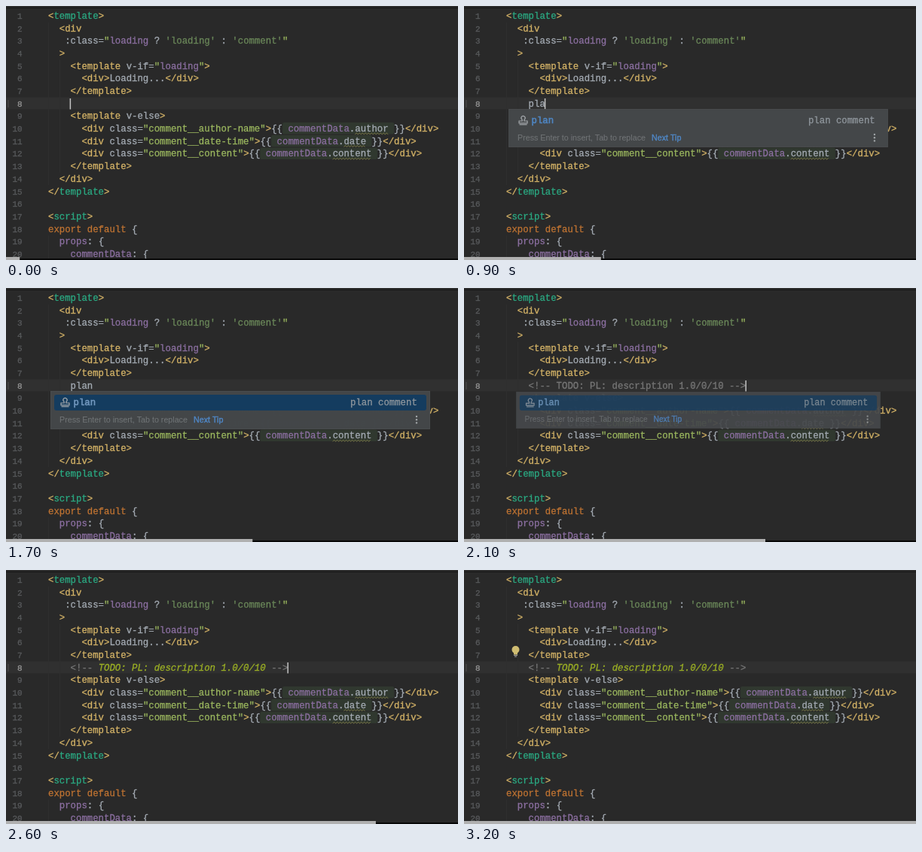
An HTML page with a canvas that plays this animation: 600 px wide and 338 px high, repeating every 3.3 s.

```html
<!DOCTYPE html>
<html lang="en">
<head>
<meta charset="utf-8">
<title>Live template</title>
<style>
html, body { margin: 0; width: 100%; height: 100%; overflow: hidden; background: #292929; }
canvas { display: block; }
</style>
</head>
<body>
<canvas id="stage" width="600" height="338"></canvas>
<script>
const ctx = document.getElementById('stage').getContext('2d');
const W = 600, H = 338, LOOP = 3300, STEP = 100;
const CH = 7.405, ROW = 16.68, LEFT = 56, BASE = 17;
const MONO = '12.34px "Liberation Mono", monospace';
const SMALL = '11px "Liberation Mono", monospace';
const SANS = '10.7px "Liberation Sans", Arial, sans-serif';
const COMMENT = '<!-- TODO: PL: description 1.0/0/10 -->';

const ink = {
  y: '#d4b367', // tag
  t: '#2ba982', // component tag
  w: '#a3aab2', // plain
  s: '#9ab65e', // attribute value
  q: '#6a8759', // string
  p: '#8b6fa0', // field
  o: '#bd7232', // keyword
  c: '#767676'  // comment
};

// Each line: indent, then colour key and text pairs
const field = (cls, name) => [6, 'y', '<div ', 'w', 'class=', 's', `"comment__${cls}"`, 'y', '>',
  'w', '{{ ', 'p', 'commentData', 'w', `.${name} }}`, 'y', '</div>'];
const lines = [
  [0, 'y', '<', 't', 'template', 'y', '>'],
  [2, 'y', '<div'],
  [3, 'w', ':class=', 's', '"', 'p', 'loading', 'w', ' ? ', 'q', "'loading'", 'w', ' : ', 'q', "'comment'", 's', '"'],
  [2, 'y', '>'],
  [4, 'y', '<template ', 'w', 'v-if=', 's', '"', 'p', 'loading', 's', '"', 'y', '>'],
  [6, 'y', '<div>', 'w', 'Loading...', 'y', '</div>'],
  [4, 'y', '</template>'],
  [4],
  [4, 'y', '<template ', 'w', 'v-else', 'y', '>'],
  field('author-name', 'author'),
  field('date-time', 'date'),
  field('content', 'content'),
  [4, 'y', '</template>'],
  [2, 'y', '</div>'],
  [0, 'y', '</', 't', 'template', 'y', '>'],
  [0],
  [0, 'y', '<', 't', 'script', 'y', '>'],
  [0, 'o', 'export default ', 'w', '{'],
  [2, 'p', 'props', 'w', ': {'],
  [4, 'p', 'commentData', 'w', ': {']
];

// When the edited line changes, and to what
const edits = [[0, ''], [500, 'p'], [600, 'pl'], [800, 'pla'], [1100, 'plan'], [2100, COMMENT]];

function rect(x, y, w, h, color) {
  ctx.fillStyle = color;
  ctx.fillRect(x, y, w, h);
}

function round(x, y, w, h, r, color) {
  ctx.fillStyle = color;
  ctx.beginPath();
  ctx.roundRect(x, y, w, h, r);
  ctx.fill();
}

function dot(x, y, r, color) {
  ctx.fillStyle = color;
  ctx.beginPath();
  ctx.arc(x, y, r, 0, 7);
  ctx.fill();
}

function text(str, x, y, color, font = MONO, weight = 0.3) {
  ctx.font = font;
  ctx.fillStyle = ctx.strokeStyle = color;
  ctx.lineWidth = weight;
  ctx.fillText(str, x, y);
  ctx.strokeText(str, x, y);
}

function wave(x, w, y) {
  ctx.strokeStyle = '#85814a';
  ctx.lineWidth = 0.9;
  ctx.beginPath();
  for (let i = 0; i <= w; i += 2) ctx.lineTo(x + i, y + (i % 4 ? -0.9 : 0.9));
  ctx.stroke();
}

function guide(col, from, to) {
  rect(Math.round(LEFT + col * CH), 5 + (from - 1) * ROW, 1, (to - from + 1) * ROW, '#2e2e2e');
}

function drawLine(line, i) {
  const y = BASE + i * ROW;
  let x = LEFT + line[0] * CH;
  for (let k = 1; k < line.length; k += 2) {
    const str = line[k + 1];
    if (str === 'commentData' && line[k + 3].startsWith('.')) {
      const name = line[k + 3].split(' ')[0];
      round(x - CH, y - 12, (name.length + 13) * CH, 15.5, 2, '#30382f');
      wave(x + 12 * CH, (name.length - 1) * CH, y + 2.8);
    }
    text(str, x, y, ink[line[k]]);
    x += str.length * CH;
  }
}

function drawEdit(t) {
  const [since, str] = edits.filter(e => e[0] <= t).pop();
  const x = LEFT + 4 * CH, y = BASE + 7 * ROW;
  if (str !== COMMENT) text(str, x, y, ink.w);
  else if (t < 2300) text(str, x, y, ink.c);
  else {
    text('<!--', x, y, ink.c);
    text(str.slice(5, -4), x + 5 * CH, y, '#9cb024', 'italic ' + MONO);
    text('-->', x + (str.length - 3) * CH, y, ink.c);
  }
  const idle = t - since;
  if (idle % 1200 < 600) rect(x + str.length * CH - 1, 123, 1.5, 14.5, '#c4c4c4');
}

function stamp(x, y, color) {
  ctx.strokeStyle = color;
  ctx.lineWidth = 1.2;
  ctx.beginPath();
  ctx.arc(x + 6.5, y + 3, 2.6, 2.2, 0.94);
  ctx.lineTo(x + 7.7, y + 7);
  ctx.lineTo(x + 12, y + 7);
  ctx.lineTo(x + 12, y + 9.8);
  ctx.lineTo(x + 1, y + 9.8);
  ctx.lineTo(x + 1, y + 7);
  ctx.lineTo(x + 5.3, y + 7);
  ctx.closePath();
  ctx.stroke();
  rect(x + 1.5, y + 11.2, 10, 1.2, color);
}

function drawPopup(t) {
  if (t < 800 || t >= 2300) return;
  const open = 1 - Math.pow(1 - Math.min(1, (t - 700) / 250), 3);
  const shut = Math.max(0, (t - 2000) / 300);
  const size = (0.96 + 0.04 * open) * (1 - 0.12 * shut);
  const picked = t >= 1300;
  ctx.save();
  ctx.globalAlpha = 0.97 * open * (1 - 0.75 * shut);
  ctx.translate(311, 162.5);
  ctx.scale(size, size);
  ctx.translate(-311, -162.5);
  rect(59, 137, 504, 51, '#4b4e50');
  rect(60, 138, 502, 49, '#444749');
  if (picked) round(64, 142, 494, 21, 3, '#133c61');
  stamp(72, 146, '#a8acb0');
  text('plan', 89.5, 155.9, picked ? '#7399c0' : '#4f86c4', MONO, 0.6);
  text('plan comment', 457, 155.9, '#92999f');
  text('Press Enter to insert, Tab to replace', 71, 179, '#717577', SANS, 0.1);
  text('Next Tip', 249, 179, '#5088c8', SANS, 0.4);
  for (let i = 0; i < 3; i++) dot(545, 171 + i * 4.2, 1.2, '#a6aaac');
  ctx.restore();
}

function drawBulb() {
  dot(68.5, 106, 5, '#d0bd72');
  rect(66, 109, 5, 3.5, '#d0bd72');
  rect(66, 113, 5, 1, '#a5a5a5');
  rect(67, 114.7, 3, 1, '#a5a5a5');
}

function draw(t) {
  rect(0, 0, W, H, '#292929');
  rect(0, 121.5, W, 16, '#303030');
  guide(0, 2, 14);
  guide(2, 5, 13);
  guide(0, 19, 20);
  rect(2, 125, 2, 10, '#404040');
  lines.forEach((line, i) => {
    ctx.textAlign = 'right';
    text(String(i + 1), 21.7, BASE + i * ROW, i === 7 ? '#949494' : '#585a5c', SMALL);
    ctx.textAlign = 'left';
    drawLine(line, i);
  });
  drawEdit(t);
  drawPopup(t);
  if (t >= 3100) drawBulb();
  rect(0, 0, W, 2, '#2c2c2c');
  rect(0, 2, W, 1, '#141414');
  rect(0, 336, W, 2, '#080808');
  rect(0, 334, W * (t + STEP) / LOOP, 4, '#b0b0b0');
}

const start = performance.now();
function tick() {
  const t = (performance.now() - start) % LOOP;
  draw(Math.floor(t / STEP) * STEP);
  requestAnimationFrame(tick);
}
tick();
</script>
</body>
</html>
```
